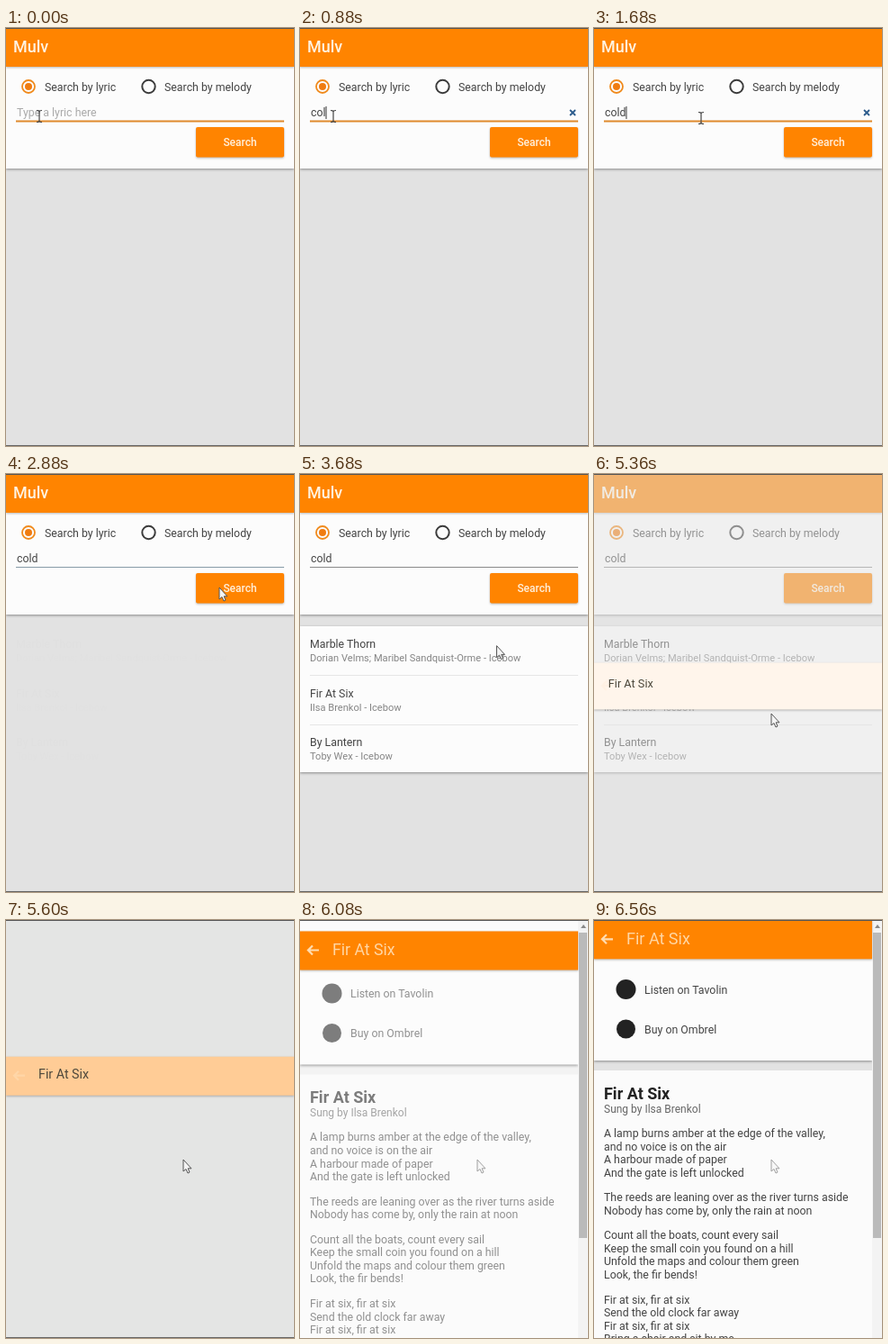
These frames come from a looping animation (320 by 464 pixels, 7.92 s). An HTML page:

```html
<!DOCTYPE html>
<html lang="en">
<head>
<meta charset="utf-8">
<title>Song search</title>
<style>
  html, body { margin: 0; width: 100%; height: 100%; overflow: hidden; background: #e2e2e2; }
  svg { display: block; width: 100vw; height: 100vh; }
  text { font-family: Roboto, "Open Sans", sans-serif; font-size: 12.35px; fill: #444; white-space: pre; }
  .card { fill: #fcfcfc; filter: drop-shadow(0 1px 1.5px #0006); }
  .bar { fill: #ff8400; }
  .raised { filter: drop-shadow(0 1px 1px #0004); }
  .brand { font-size: 18px; font-weight: 500; fill: #fff3e2; }
  .hint { fill: #aaa; }
  .sub { font-size: 11.1px; fill: #858585; }
  .song { font-size: 18px; font-weight: 700; fill: #222; }
  .rule { stroke: #e6e6e6; }
</style>
</head>
<body>
<svg viewBox="0 0 320 464" preserveAspectRatio="none">
  <rect width="320" height="464" fill="#e2e2e2"/>
  <rect id="veil" width="320" height="464" fill="#e4e5e4"/>

  <g id="searchPage">
    <rect class="card" y="30" width="320" height="126"/>
    <rect class="bar raised" width="320" height="43"/>
    <text class="brand" x="8" y="27">Mulv</text>
    <circle cx="25" cy="65" r="7" fill="none" stroke="#f08a1c" stroke-width="1.8"/>
    <circle cx="25" cy="65" r="4" fill="#f07c10"/>
    <text x="43" y="70">Search by lyric</text>
    <circle cx="158.500" cy="65" r="7.200" fill="none" stroke="#3c3c3c" stroke-width="2"/>
    <text x="176" y="70">Search by melody</text>
    <text id="hint" class="hint" x="12" y="98">Type a lyric here</text>
    <text id="query" x="12" y="98"></text>
    <path id="caret" d="M0 87V101" stroke="#333"/>
    <path id="clear" d="M300 91l6 6m0-6l-6 6" stroke="#2b5b8c" stroke-width="1.8"/>
    <path id="underline" d="M11 103.500H309"/>
    <rect class="bar raised" x="211" y="110" width="98" height="33.500" rx="2"/>
    <text x="260" y="131" text-anchor="middle" style="font-size:12px;font-weight:500;fill:#fff0dc">Search</text>
    <g id="results">
      <rect class="card" y="169" width="320" height="162"/>
      <path class="rule" d="M11 223.500H309M11 278.500H309"/>
    </g>
  </g>

  <g id="songPage">
    <rect width="320" height="464" fill="#fbfbfb"/>
    <g id="songBody">
      <rect id="gap" y="156" width="309" height="11" fill="#e2e2e2"/>
      <rect class="card" y="20" width="309" height="136"/>
      <g id="songText">
        <circle cx="35.500" cy="77" r="11" fill="#222"/>
        <circle cx="35.500" cy="121" r="10.500" fill="#222"/>
        <text x="56" y="81.500">Listen on Tavolin</text>
        <text x="56" y="125.500">Buy on Ombrel</text>
        <text class="song" x="11" y="199">Fir At Six</text>
        <text x="11" y="214" style="font-size:12px;fill:#666">Sung by Ilsa Brenkol</text>
      </g>
    </g>
    <g id="scrollbar">
      <rect x="309" width="11" height="464" fill="#f3f3f3"/>
      <rect x="310" y="14" width="9" height="339" fill="#bababa"/>
      <path d="M312 9l3-4 3 4z" fill="#888"/>
    </g>
  </g>

  <g id="hero">
    <rect id="heroBar" class="raised"/>
    <path id="back" d="M21 0H9m5-5l-5 5 5 5" fill="none" stroke="#ffdcb0" stroke-width="2.200"/>
    <text id="heroTitle">Fir At Six</text>
  </g>

  <rect width="320" height="1" fill="#555"/>
  <rect id="bottomLine" y="463" width="320" height="1" fill="#666"/>
  <path id="beam" d="M-3-6.500Q0-6.500 0-5Q0-6.500 3-6.500M0-5V5M-3 6.500Q0 6.500 0 5Q0 6.500 3 6.500" fill="none" stroke="#444" stroke-width="1.200"/>
  <path id="arrow" d="M0 0V13L3 10.500 5 15 7 14 5.200 9.800H9Z" fill="#f4f4f4" stroke="#555"/>
</svg>
<script>
const LOOP = 7920, STEP = 80, SETTLED = 6560;
const HERO_START = 5203, HERO_TIME = 1020;
const $ = id => document.getElementById(id);
const SVG = "http://www.w3.org/2000/svg";

const songs = [
  ["Marble Thorn", "Dorian Velms; Maribel Sandquist-Orme - Icebow"],
  ["Fir At Six", "Ilsa Brenkol - Icebow"],
  ["By Lantern", "Toby Wex - Icebow"]
];
const verses = [
  ["A lamp burns amber at the edge of the valley,", "and no voice is on the air",
   "A harbour made of paper", "And the gate is left unlocked"],
  ["The reeds are leaning over as the river turns aside", "Nobody has come by, only the rain at noon"],
  ["Count all the boats, count every sail", "Keep the small coin you found on a hill",
   "Unfold the maps and colour them green", "Look, the fir bends!"],
  ["Fir at six, fir at six", "Send the old clock far away",
   "Fir at six, fir at six", "Bring a chair and sit by me"]
];
// time, x, y of the pointer's hot spot
const pointerPath = [
  [0, 37, 98], [1300, 37, 98], [1680, 119, 100], [2320, 237, 126],
  [3200, 237, 126], [4240, 197, 266], [LOOP, 197, 266]
];
const keyTimes = [400, 560, 800, 1040];

function addText(parent, text, y, className = "") {
  const node = document.createElementNS(SVG, "text");
  node.textContent = text;
  node.setAttribute("x", 11);
  node.setAttribute("y", y);
  node.setAttribute("class", className);
  parent.append(node);
}

songs.forEach(([title, credit], i) => {
  addText($("results"), title, 193 + i * 54.6);
  addText($("results"), credit, 208 + i * 54.6, "sub");
});

let lineY = 241;
for (const verse of verses) {
  for (const line of verse) {
    addText($("songText"), line, lineY);
    lineY += 14.55;
  }
  lineY += 13;
}

const clamp = v => Math.max(0, Math.min(1, v));
const span = (t, from, to) => clamp((t - from) / (to - from));
const smooth = p => p * p * (3 - 2 * p);
const lerp = (a, b, p) => a + (b - a) * p;
const mix = (a, b, p) => `rgb(${a.map((v, i) => Math.round(lerp(v, b[i], p)))})`;
const set = (id, attrs) => {
  for (const key in attrs) $(id).setAttribute(key, attrs[key]);
};

function pointerAt(t) {
  const i = pointerPath.findIndex(k => k[0] > t);
  const [t0, x0, y0] = pointerPath[i - 1], [t1, x1, y1] = pointerPath[i];
  const p = span(t, t0, t1);
  return [lerp(x0, x1, p), lerp(y0, y1, p)];
}

function drawSearch(t) {
  const typed = keyTimes.filter(k => t >= k).length;
  const focused = t < 2640;
  $("query").textContent = "cold".slice(0, typed);
  const caretX = 12.5 + (typed ? $("query").getComputedTextLength() : 0);
  set("hint", { opacity: typed ? 0 : 1 });
  set("caret", { transform: `translate(${caretX})`, opacity: focused && typed ? 1 : 0 });
  set("clear", { opacity: focused && typed ? 1 : 0 });
  set("underline", {
    stroke: focused ? "#e08a2c" : t < 3200 ? "#879ba8" : "#8a8a8a",
    "stroke-width": focused ? 1.8 : 1.1
  });
  set("results", { opacity: smooth(span(t, 2860, 3280)) });
  const leaving = span(t, HERO_START, 5520);
  set("searchPage", { opacity: 1 - leaving });
  set("veil", { opacity: leaving });
}

function drawSong(t) {
  const p = smooth(span(t, HERO_START, HERO_START + HERO_TIME));
  const height = lerp(54, 43, clamp(p * 3));
  const center = lerp(250, 21.8, p);
  const scrolling = t >= 5920;
  set("songPage", { opacity: span(t, 5640, 6000) });
  set("songBody", { transform: `translate(0 ${84 * (1 - p)})` });
  set("songText", { opacity: span(t, 5640, 6400) });
  set("gap", { opacity: span(t, 5900, 6400) });
  set("scrollbar", { opacity: scrolling ? 1 : 0 });
  set("hero", { opacity: span(t, HERO_START, HERO_START + 80) });
  set("heroBar", {
    y: center - height / 2, height,
    width: scrolling ? 309 : 320,
    fill: mix([255, 255, 255], [255, 132, 0], clamp(p * 1.22))
  });
  set("back", { transform: `translate(0 ${center - 0.5})`, opacity: clamp(p * 2) });
  const titleFill = mix([76, 72, 60], [255, 214, 164], span(p, 0.34, 0.85));
  set("heroTitle", {
    x: lerp(11, 36, clamp(p * 3)),
    y: center + lerp(1, 5, p),
    style: `font-size:${lerp(12.35, 18, p)}px;fill:${titleFill}`
  });
  set("bottomLine", { opacity: 1 - span(t, 5640, 6000) });
}

function drawPointer(t) {
  const [x, y] = pointerAt(t);
  const transform = `translate(${x} ${y})`;
  const typing = y < 108;
  set("beam", { transform, opacity: typing ? 1 : 0 });
  set("arrow", { transform, opacity: typing ? 0 : lerp(1, 0.55, span(t, 5680, 6080)) });
}

function render(now) {
  const t = Math.min(SETTLED, Math.floor((now % LOOP) / STEP) * STEP);
  drawSearch(t);
  drawSong(t);
  drawPointer(t);
}

const start = performance.now();
function tick() {
  render(performance.now() - start);
  requestAnimationFrame(tick);
}
tick();
</script>
</body>
</html>
```
